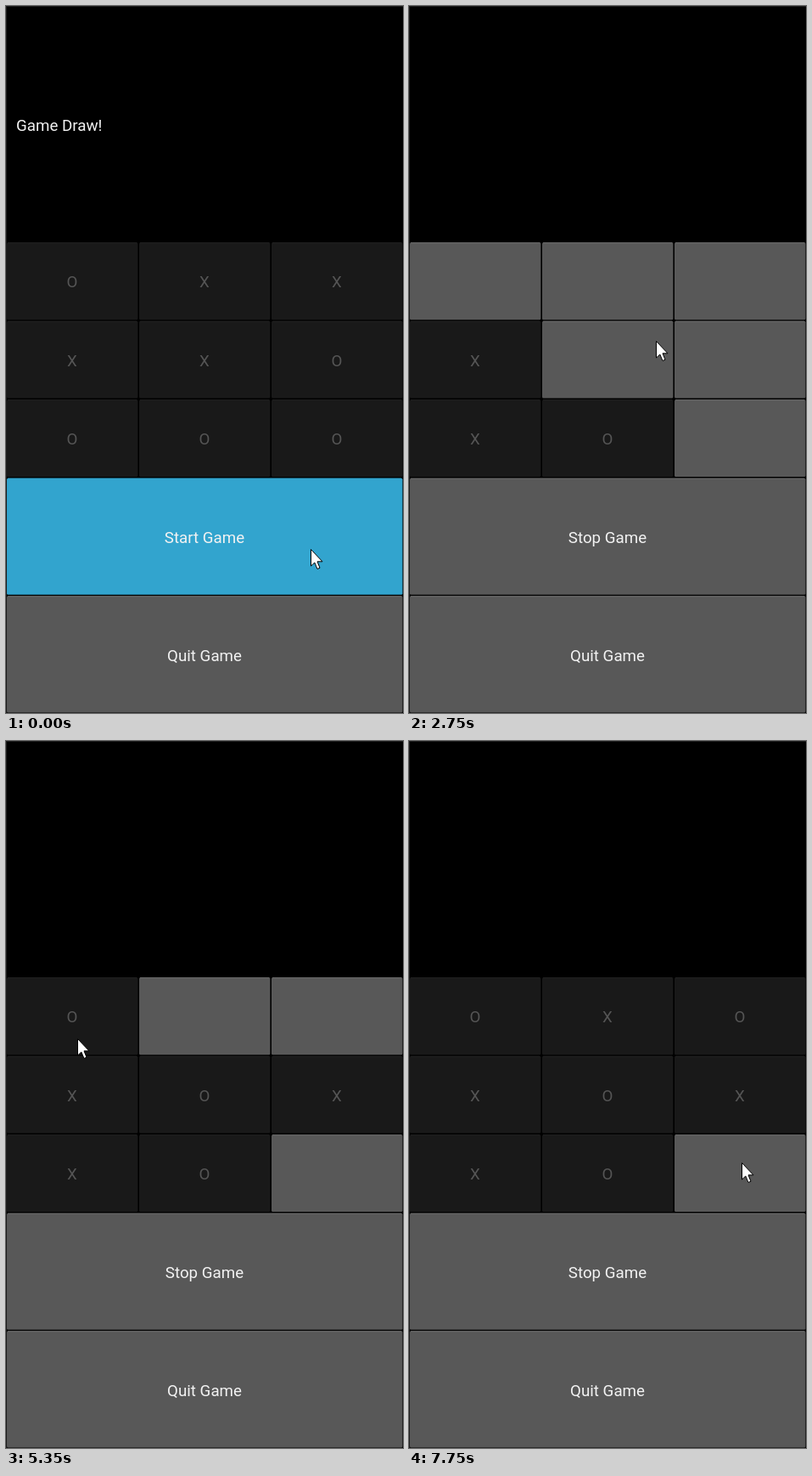
Recreate the animation shown at these times as an HTML page. Size 468 by 832 pixels, loop 8 s.

```html
<!DOCTYPE html>
<html lang="en">
<head>
<meta charset="utf-8">
<title>Noughts and crosses</title>
<style>
html, body { margin: 0; width: 100%; height: 100%; overflow: hidden; background: #000; }
svg { display: block; width: 468px; height: 832px; }
text { font: 18.75px Roboto, sans-serif; fill: #f2f2f2; text-anchor: middle; }
.face { fill: #585858; }
.edge { fill: #6c6c6c; }
.down .face, .down .edge { fill: #32a4ce; }
.off .face { fill: #191919; }
.off .edge { fill: #222; }
.off text { fill: #555; }
</style>
</head>
<body>
<svg id="stage" viewBox="0 0 468 832">
  <rect width="468" height="832" fill="#000"/>
  <path d="M0 .5H468M.5 0V832" stroke="#1c1c1c" fill="none"/>
</svg>
<script>
const LOOP = 8000, TICK = 50, WIDTH = 468, ROW = 832 / 6;
const CELL_W = WIDTH / 3, CELL_H = ROW * 2 / 3, BOARD_TOP = ROW * 2;
const stage = document.getElementById('stage');

function add(parent, tag, attrs) {
  const el = document.createElementNS('http://www.w3.org/2000/svg', tag);
  for (const key in attrs) el.setAttribute(key, attrs[key]);
  return parent.appendChild(el);
}

const baseline = middle => Math.floor(middle + 8.4);

function button(x, y, w, h, label = '') {
  const g = add(stage, 'g', {});
  add(g, 'rect', { class: 'face', x: x + 1, y: y + 1, width: w - 1.6, height: h - 1.6, rx: 1.5 });
  add(g, 'rect', { class: 'edge', x: x + 2, y: y + 1, width: w - 3.6, height: 1 });
  const text = add(g, 'text', { x: x + w / 2, y: baseline(y + h / 2) });
  text.textContent = label;
  return { g, text };
}

function show(b, state, label) {
  b.g.setAttribute('class', state);
  b.text.textContent = label;
}

const message = add(stage, 'text', { x: 12, y: baseline(ROW), style: 'text-anchor:start' });
const cells = Array.from({ length: 9 }, (_, i) =>
  button(i % 3 * CELL_W, BOARD_TOP + Math.floor(i / 3) * CELL_H, CELL_W, CELL_H));
const startButton = button(0, ROW * 4, WIDTH, ROW);
button(0, ROW * 5, WIDTH, ROW, 'Quit Game');

const cursor = add(stage, 'path', {
  d: 'M.5 .5V20L4.8 16 8 23.5 11 22.2 8 14.8H14Z',
  fill: '#fff', stroke: '#000', 'stroke-linejoin': 'round'
});

const RESET = 50, OLD_BOARD = 'OXXXXOOOO', HOME = [359, 639];

// A glide ends at `at`; with a hold, the cell under the pointer is pressed after a pause.
const glide = (at, time, x, y, hold = 0, pause = 250) => ({ at, time, x, y, hold, press: at + pause });
const glides = [
  glide(500, 400, 152, 536, 200),
  glide(1200, 100, 271, 515, 150),
  glide(1950, 200, 47, 381, 200, 300),
  glide(2750, 300, 291, 394, 200),
  glide(3700, 200, 362, 409),
  glide(3750, 50, 369, 396, 250),
  glide(4550, 200, 71, 301),
  glide(4700, 50, 6, 291),
  glide(4850, 150, 84, 350, 250),
  glide(5600, 150, 221, 342, 250),
  glide(6400, 200, 433, 324),
  glide(6750, 150, 404, 344, 150, 500),
  glide(7600, 200, 159, 603),
  glide(7750, 150, 392, 496)
];
const presses = glides.filter(g => g.hold);

function cellUnder({ x, y }) {
  return cells[Math.floor((y - BOARD_TOP) / CELL_H) * 3 + Math.floor(x / CELL_W)];
}

function pointerAt(t) {
  let [x, y] = HOME;
  for (const g of glides) {
    const p = Math.min(1, Math.max(0, 1 - (g.at - t) / g.time));
    x += (g.x - x) * p;
    y += (g.y - y) * p;
  }
  return [Math.round(x), Math.round(y)];
}

function draw(t) {
  const over = t < RESET;
  message.textContent = over ? 'Game Draw!' : '';
  show(startButton, over ? 'down' : '', over ? 'Start Game' : 'Stop Game');
  cells.forEach((cell, i) => show(cell, over ? 'off' : '', over ? OLD_BOARD[i] : ''));
  presses.forEach((g, turn) => {
    if (t >= g.press + g.hold) show(cellUnder(g), 'off', 'XO'[turn % 2]);
    else if (t >= g.press) show(cellUnder(g), 'down', '');
  });
  cursor.setAttribute('transform', `translate(${pointerAt(t)})`);
}

const begin = performance.now();
let last = -1;
function frame(now) {
  const t = Math.floor(Math.max(0, now - begin) % LOOP / TICK) * TICK;
  if (t !== last) draw(last = t);
  requestAnimationFrame(frame);
}
draw(0);
requestAnimationFrame(frame);
</script>
</body>
</html>
```
